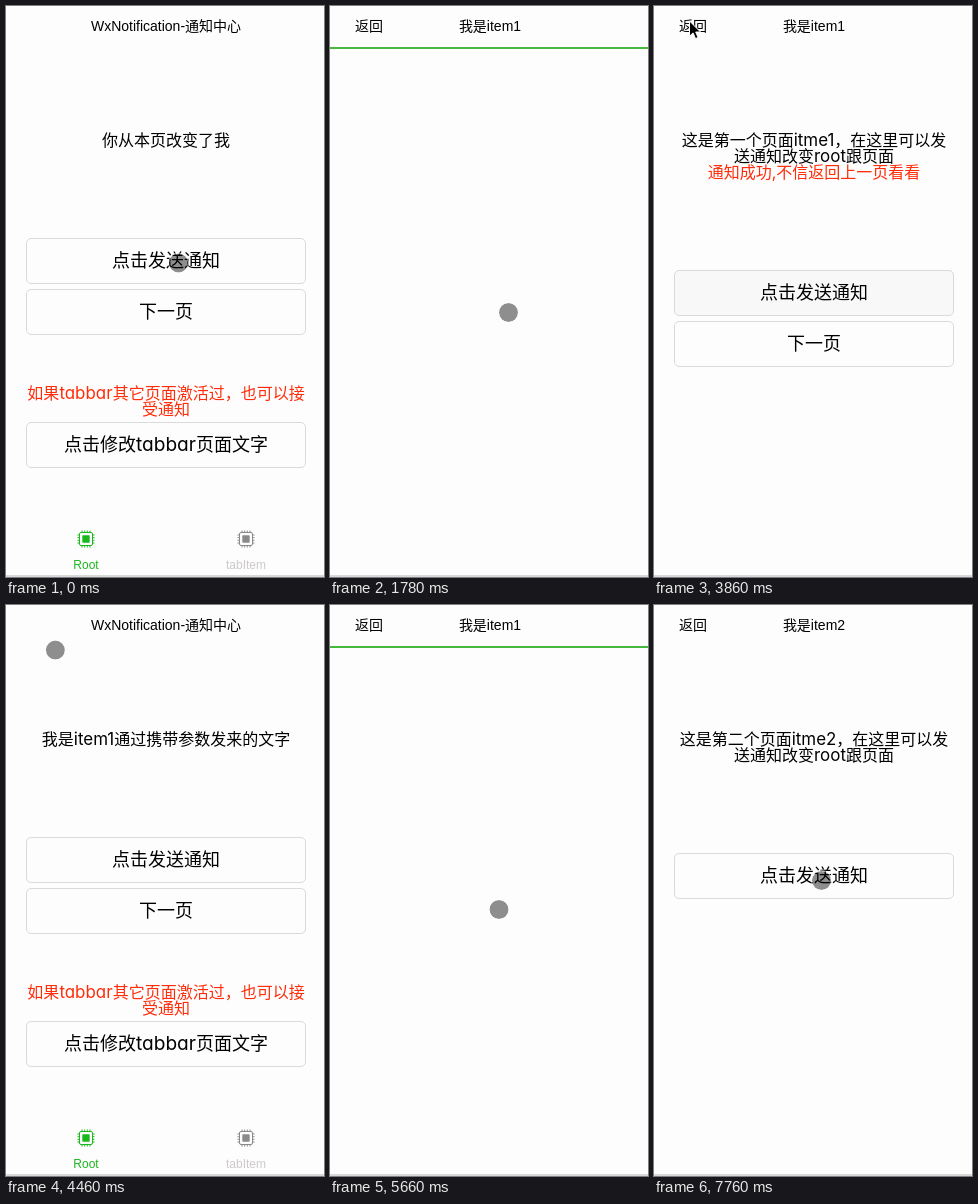
These frames come from a looping animation (318x571 px, 8 s). An HTML page:

```html
<!DOCTYPE html>
<html lang="zh-CN">
<head>
<meta charset="utf-8">
<title>WxNotification</title>
<style>
  html, body { margin: 0; width: 100%; height: 100%; overflow: hidden; background: #fdfdfd; }
  svg { display: block; width: 318px; height: 571px; }
  text { text-anchor: middle; fill: #000; }
  .bar { font: 14px 'Liberation Sans', 'Noto Sans CJK SC', 'Noto Sans CJK', sans-serif; }
  .tab { font: 12px 'Liberation Sans', sans-serif; }
  .body, .btn { font: 16px Inter, 'Noto Sans CJK SC', 'Noto Sans CJK', sans-serif; font-feature-settings: 'cv11'; }
  .btn { font-size: 18px; }
  .latin { font-size: 1.06em; }
</style>
</head>
<body>
<svg id="stage" viewBox="0 0 318 571"></svg>
<script>
const LOOP = 8000, TICK = 148.9, LEAD = 14;
const MID = 160, BG = '#fdfdfd', RED = '#ff2d0a', GREEN = '#1bb81d';
const stage = document.getElementById('stage');

const rect = (x, y, w, h, fill, more = '') =>
  `<rect x="${x}" y="${y}" width="${w}" height="${h}" fill="${fill}" ${more}/>`;
const text = (cls, s, y, color = '#000', x = MID) =>
  `<text class="${cls}" x="${x}" y="${y}" style="fill:${color}">${s}</text>`;
const mixed = s => s.replace(/[a-z0-9]+/gi, '<tspan class="latin">$&</tspan>');
const lines = (rows, y, color) =>
  rows.map((s, i) => text('body', mixed(s), y + 16 * i, color)).join('');

function button(label, y, state) {
  const fill = { down: '#e4e4e4', warm: '#f8f8f8' }[state] || BG;
  const edge = state === 'down' ? '#cbcbcb' : '#dadada';
  return rect(20.5, y + .5, 279, 45, fill, `rx="4.5" stroke="${edge}"`) +
    text('btn', mixed(label), y + 28.8);
}

function chip(x, y, color) {
  const side = 'M-4 -6.5v-2M-1.3 -6.5v-2M1.3 -6.5v-2M4 -6.5v-2';
  const pins = [0, 90, 180, 270].map(a => `<path d="${side}" transform="rotate(${a})"/>`).join('');
  return `<g transform="translate(${x} ${y})" stroke="${color}" fill="none">${pins}
    <rect x="-6.5" y="-6.5" width="13" height="13" rx="1.5"/>
    ${rect(-3.7, -3.7, 7.4, 7.4, color, 'rx=".8" stroke="none"')}</g>`;
}

function root({ message = '你从本页改变了我', next } = {}) {
  return text('bar', 'WxNotification-通知中心', 25) +
    lines([message], 140) +
    button('点击发送通知', 232) +
    button('下一页', 283, next) +
    lines(['如果tabbar其它页面激活过，也可以接', '受通知'], 393, RED) +
    button('点击修改tabbar页面文字', 416) +
    chip(80, 533, GREEN) + text('tab', 'Root', 563, GREEN, 80) +
    chip(240, 533, '#8a8a8a') + text('tab', 'tabItem', 563, '#cdc9cd', 240);
}

function item(n, { empty, loading, sent, send } = {}) {
  let out = text('bar', '返回', 25, '#000', 39) + text('bar', '我是item' + n, 25);
  if (loading) out += rect(0, 41, 318, 2, '#45b83d');
  if (empty) return out;
  const intro = `这是第${n === 1 ? '一' : '二'}个页面itme${n}，在这里可以发`;
  const top = sent ? 264 : 248;
  out += lines([intro, '送通知改变root跟页面'], 140);
  if (sent) out += lines(['通知成功,不信返回上一页看看'], 172, RED);
  out += button('点击发送通知', top, send);
  if (n === 1) out += button('下一页', top + 51);
  return out;
}

const cover = (x, content = '') =>
  `<g transform="translate(${x} 0)">${rect(0, 0, 320, 569, BG)}${content}</g>`;

// Slide a blank page over the old one, then show its title and loading bar.
const open = (from, n) => [
  [1, from + cover(178)],
  [1, item(n, { empty: true, loading: true })]
];

const message = '我是item1通过携带参数发来的文字';
const home = root(), renamed = root({ message });
const first = item(1), sent = item(1, { sent: true, send: 'warm' });

// Views in order, each with its length in ticks
const story = [
  [9, home],
  [1, root({ next: 'down' })],
  [1, home],
  ...open(home, 1),
  [4, first],
  [1, item(1, { send: 'down' })],
  [1, item(1, { sent: true, send: 'down' })],
  [8, sent],
  [1, renamed + cover(140, sent)],
  [7, renamed],
  [1, root({ message, next: 'down' })],
  [1, renamed],
  ...open(renamed, 1),
  [2, item(1, { loading: true })],
  [4, first],
  ...open(first, 2),
  [Infinity, item(2)]
];

function viewAt(tick) {
  for (const [length, view] of story) {
    if (tick < length) return view;
    tick -= length;
  }
}

// Pointer moves: first and last tick, then the place reached
const moves = [
  { from: 3, to: 6, x: 178.5, y: 306.5 },
  { from: 16, to: 17, x: 173.5, y: 274.5 },
  { from: 21, to: 26, x: 35.5, y: 15 },
  { from: 30, to: 34, x: 169, y: 304.5 },
  { from: 41, to: 42, x: 160.5, y: 324.5 },
  { from: 48, to: 51, x: 163, y: 272 },
  { from: 52, to: 52, x: 167.5, y: 275.5 }
];
const ease = p => p * p * (3 - 2 * p);

function pointerAt(tick) {
  let x = 172.5, y = 257;
  for (const m of moves) {
    if (tick < m.from) break;
    const p = ease(Math.min(1, (tick - m.from + 1) / (m.to - m.from + 1)));
    x += (m.x - x) * p;
    y += (m.y - y) * p;
  }
  return { x, y };
}

// An arrow over the title bar, a touch dot over the page
function pointer({ x, y }) {
  if (y < 41) return `<path transform="translate(${x} ${y})" fill="#000" stroke="#fff"
    d="M0 0V15.2L3.6 11.9 6 17.6 8.6 16.5 6.2 11H11Z"/>`;
  return `<circle cx="${x}" cy="${y}" r="9.5" fill-opacity=".44"/>
    <circle cx="${x}" cy="${y}" r="10" fill="none" stroke="#fff" stroke-opacity=".6"/>`;
}

const start = performance.now();
let shown;

function draw(now) {
  const t = Math.max(0, now - start) % LOOP;
  const tick = Math.floor((t + LEAD) / TICK);
  if (tick !== shown) {
    stage.innerHTML = rect(0, 0, 318, 571, BG) + viewAt(tick) +
      rect(0, 569, 318, 2, '#d8d8d8') + pointer(pointerAt(tick));
    shown = tick;
  }
  requestAnimationFrame(draw);
}

draw(start);
</script>
</body>
</html>
```
